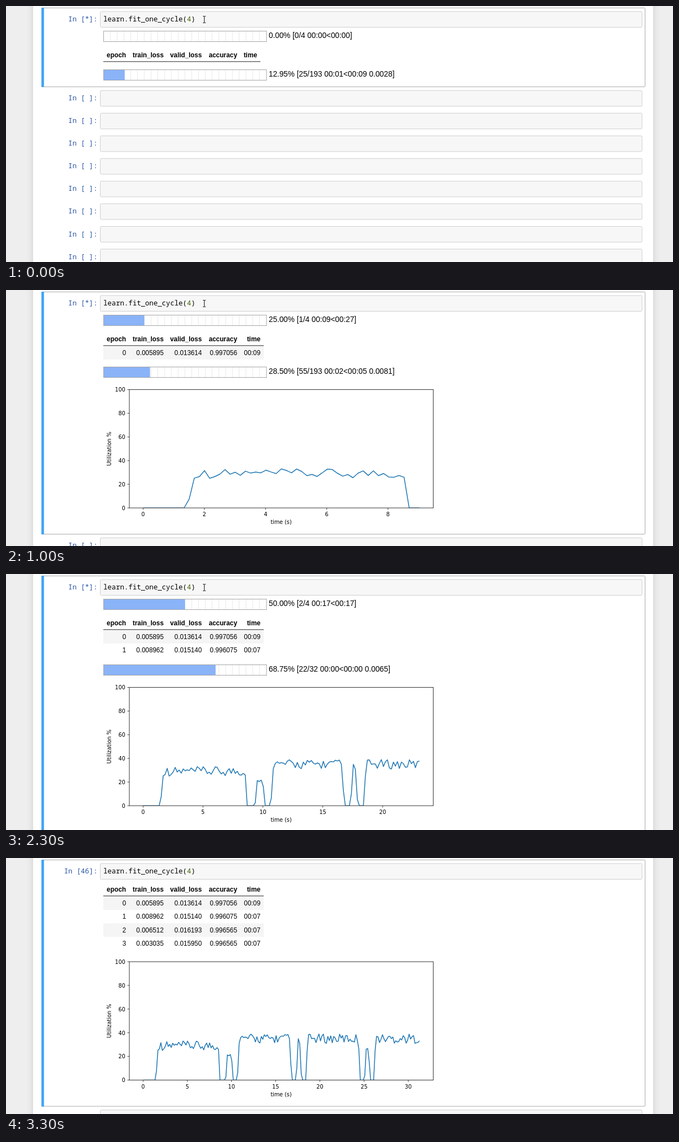
An HTML page that plays this animation: 1206 px wide and 464 px high, repeating every 3.4 s.

```html
<!DOCTYPE html>
<html lang="en">
<head>
<meta charset="utf-8">
<title>Training progress</title>
<style>
html, body { margin: 0; width: 100%; height: 100%; overflow: hidden; }
body { background: linear-gradient(90deg, #eee 36px, #e9e9e9 43px, #ddd 49px, #fff 49px,
  #fff 1170px, #ddd 1170px, #e9e9e9 1176px, #eee 1183px); }
svg { display: block; width: 100%; height: 100%; }
text { white-space: pre; }
.code { font: 12.6px "Noto Sans Mono", monospace; }
.prompt { fill: #2b54a3; text-anchor: end; }
.note { font: 13.8px "Liberation Sans", Arial, sans-serif; }
.cell { font: 11.85px "Liberation Sans", Arial, sans-serif; text-anchor: end; }
.head { font-weight: bold; }
.plot { font: 9.85px "DejaVu Sans", sans-serif; }
.mid { text-anchor: middle; }
.end { text-anchor: end; }
</style>
</head>
<body>
<svg id="stage"></svg>
<script>
const STEP = 100, STEPS = 34, ROW = 24.45, SAMPLE = 0.1672;
const TRAIN = 193, VALID = 32, VALID_RATE = 40, FINISH = 31;

// Steps at which training and validation begin, batches per step, samples plotted so far
const epochs = [
  { train: -0.93, rate: 27, valid: 6.9, seen: 0, spent: 0 },
  { train: 8.28, rate: 32, valid: 14.58, seen: 54, spent: 9 },
  { train: 16.16, rate: 32, valid: 22.45, seen: 96, spent: 17 },
  { train: 23.69, rate: 32, valid: 30, seen: 144, spent: 24 }
];
// Busy spans of the GPU in samples: from, to, mean load
const busy = [
  [8.7, 52, 29], [55.9, 61, 19], [63.75, 100.5, 35], [103.6, 107.2, 32],
  [110, 147, 35], [149.85, 153.6, 30], [156, 200, 35]
];
const lossKeys = [[0, .0028], [7, .0059], [14, .011], [19, .0096], [23, .0065], [27, .0037], [30, .003]];
const heads = ['epoch', 'train_loss', 'valid_loss', 'accuracy', 'time'];
const results = [
  ['0', '0.005895', '0.013614', '0.997056', '00:09'],
  ['1', '0.008962', '0.015140', '0.996075', '00:07'],
  ['2', '0.006512', '0.016193', '0.996565', '00:07'],
  ['3', '0.003035', '0.015950', '0.996565', '00:07']
];

const text = (cls, x, y, s, more = '') => `<text class="${cls}" x="${x}" y="${y}" ${more}>${s}</text>`;
const rect = (x, y, w, h, fill, more = '') =>
  `<rect x="${x}" y="${y}" width="${w}" height="${h}" fill="${fill}" ${more}/>`;
const path = (d, stroke, width = 1) =>
  `<path d="${d}" fill="none" stroke="${stroke}" stroke-width="${width}"/>`;
const clock = s => '00:' + String(Math.floor(s)).padStart(2, '0');

function between(keys, x) {
  const i = Math.max(1, keys.findIndex(k => k[0] >= x));
  const [[x0, y0], [x1, y1]] = [keys[i - 1], keys[i]];
  return y0 + (y1 - y0) * (x - x0) / (x1 - x0);
}

// Steep ramps at both ends of a busy span, seeded jitter in the middle
function load(i) {
  const span = busy.find(([from, to]) => i > from && i < to);
  if (!span) return 0;
  const [from, to, mean] = span;
  const noise = Math.abs(Math.sin(i * 12.9898) * 43758.5453) % 1;
  return Math.min(mean + 8 * (noise - .5), 25 * (i - from), 26 * (to - i));
}

function input(y, prompt) {
  return rect(170.5, y, 979.5, 28.5, '#f7f7f7', 'stroke="#cfcfcf" rx="2"')
    + text('code prompt', 165.5, y + 18, `In [${prompt}]:`);
}

function bar(y, done, total, spent, loss = '') {
  const part = done / total;
  let ticks = '';
  for (let i = 1; i < 24; i++) ticks += `M${176.5 + i * 12.25} ${y}v19`;
  const left = done ? spent * (total - done) / done : 0;
  const label = `${(part * 100).toFixed(2)}% [${done}/${total} ${clock(spent)}&lt;${clock(left)}${loss}]`;
  return rect(176.5, y, 294.5, 19, '#fff') + path(ticks, '#e8e8e8')
    + rect(176.5, y, 294.5 * part, 19, '#8ab3f8')
    + rect(176.5, y, 294.5, 19, 'none', 'stroke="#a6a6a6"')
    + text('note', 475, y + 12.9, label);
}

function table(y, rows) {
  const rights = [217, 285, 354, 418, rows ? 460 : 454];
  const line = (cells, cls, base) => cells.map((s, i) => text(cls, rights[i], base, s)).join('');
  let out = line(heads, 'cell head', y);
  for (let i = 0; i < rows; i++) {
    if (i % 2 == 0) out += rect(176, y + 8.5 + i * ROW, 290, ROW, '#f5f5f5');
    out += line(results[i], 'cell', y + 25 + i * ROW);
  }
  return out + path(`M176 ${y + 7.8}H${rows ? 466 : 460}`, '#222');
}

function chart(top, last) {
  const left = 223, width = 549.5, height = 214.5, base = top + height;
  const span = last * SAMPLE, scale = width / 1.1 / span, zero = left + width / 22;
  const py = v => base - v * height / 100;
  let line = '', marks = '', out = '';
  for (let i = 0; i <= last; i++)
    line += `${i ? 'L' : 'M'}${(zero + i * SAMPLE * scale).toFixed(2)} ${py(load(i)).toFixed(2)}`;
  for (let v = 0; v <= 100; v += 20) {
    marks += `M${left} ${py(v)}h-3.5`;
    out += text('plot end', 215.7, py(v) + 3.8, v);
  }
  const gap = span < 9 ? 1 : span < 18 ? 2 : 5;
  for (let v = 0; v <= span * 1.05; v += gap) {
    const x = zero + v * scale;
    marks += `M${x} ${base}v3.5`;
    out += text('plot mid', x, base + 15, v);
  }
  const mid = top + height / 2;
  return `<clipPath id="area">${rect(left, top, width, height, '#000')}</clipPath>`
    + `<g clip-path="url(#area)" stroke-linejoin="round">${path(line, '#1f77b4', 1.5)}</g>`
    + path(marks, '#333', .9) + rect(left, top, width, height, 'none', 'stroke="#333"') + out
    + text('plot mid', 497.5, base + 29, 'time (s)')
    + text('plot mid', 190, mid, 'Utilization %', `transform="rotate(-90 190 ${mid})"`);
}

function progress(step, rows, shift) {
  const { train, rate, valid, seen, spent } = epochs[rows];
  const trained = Math.round(Math.max(0, (step - train) * rate));
  const validating = trained > TRAIN;
  const done = validating ? Math.round((step - valid) * VALID_RATE) : trained;
  const time = done && (validating ? done / VALID_RATE + .4 : done / rate + .5);
  const loss = done ? ' ' + between(lossKeys, step).toFixed(4) : '';
  return {
    last: validating ? step * 6 : seen,
    bars: bar(45.5, rows, epochs.length, spent)
      + bar(115.5 + shift, done, validating ? VALID : TRAIN, time, loss)
  };
}

function scene(step) {
  const over = step >= FINISH;
  const rows = over ? 4 : Math.floor(step / 8);
  const shift = Math.round(rows * ROW);
  const { last, bars } = over ? { last: 187, bars: '' } : progress(step, rows, shift);
  const top = over ? 188 : 156.5 + shift;
  const bottom = last ? top + 262 : 146.5;

  let out = rect(64.5, 3.5, 1091, bottom - 3.5, '#fff', 'stroke="#ababab" rx="1"')
    + rect(64, 3, 4.7, bottom - 2.5, '#42a5f5')
    + input(10, over ? 46 : '*')
    + text('code', 176, 28, 'learn.fit_one_cycle(<tspan fill="#460">4</tspan>)')
    + table(over ? 61 : 93, rows) + bars;
  if (last) out += chart(top, last);
  for (let y = bottom + 6.7; y < 464; y += 41.05) out += input(y, ' ');
  if (step < 33) out += path('M356 18.5h2l.5 .5l.5 -.5h2M358.5 19v11M356 30.5h2l.5 -.5l.5 .5h2', '#111');
  return out;
}

const stage = document.getElementById('stage');
let shown = -1;
function tick() {
  const step = Math.floor(performance.now() / STEP) % STEPS;
  if (step != shown) stage.innerHTML = scene(shown = step);
  requestAnimationFrame(tick);
}
tick();
</script>
</body>
</html>
```
